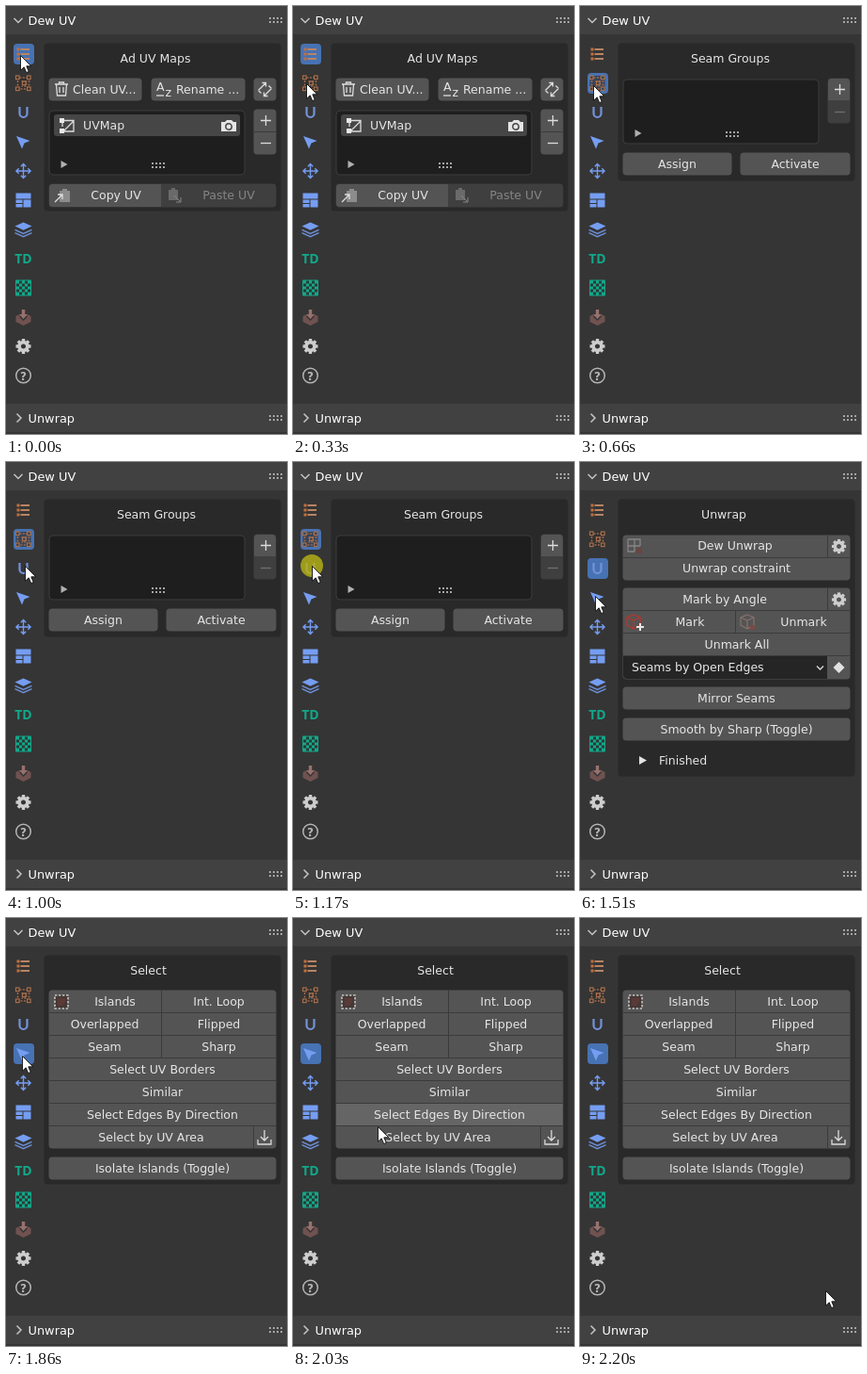
Animation, 299 px wide and 454 px high, one loop 2370 ms. Source, as an HTML page:

```html
<!DOCTYPE html>
<html lang="en">
<head>
<meta charset="utf-8">
<title>UV tools sidebar</title>
<style>
  html, body { margin: 0; width: 100%; height: 100%; overflow: hidden; background: #353535; }
  svg { display: block; width: 299px; height: 454px; }
  text { font: 12.5px "DejaVu Sans", sans-serif; fill: #e6e6e6; }
  .head { font-size: 12.9px; fill: #fff; }
  .dim { fill: #858585; }
  .td { font: bold 14px "Open Sans", sans-serif; fill: #12a88a; }
  .help { font-size: 12px; font-weight: bold; fill: #b4b4b4; }
  .line { fill: none; stroke: #dcdcdc; stroke-width: 1.3; }
  .blue { fill: #759df2; }
  .anim { animation: 2370ms step-end infinite; }
</style>
</head>
<body>
<svg id="stage" viewBox="0 0 299 454"></svg>
<script>
const LOOP = 2370;
const BTN = '#545454', GAP = '#3b3b3b';

// Drawing helpers; all return markup
const rect = (x, y, w, h, fill, r = 0, more = '') =>
  `<rect x="${x}" y="${y}" width="${w}" height="${h}" rx="${r}" fill="${fill}" ${more}/>`;
const path = (d, attrs = 'class="line"') => `<path d="${d}" ${attrs}/>`;
const text = (s, x, y, anchor = 'middle', cls = '') =>
  `<text x="${x}" y="${Math.round(y + 4.5)}" text-anchor="${anchor}" class="${cls}">${s}</text>`;
const at = (x, y, body) => `<g transform="translate(${x} ${y})">${body}</g>`;
// Half-pixel rim keeps box edges soft
const box = (x, y, w, h, fill) => rect(x - .5, y - .5, w + 1, h + 1, fill, 4);
const button = (x, y, w, h = 23, fill = BTN) => box(x, y, w, h, fill);
const label = (s, x, y, w) => button(x, y, w) + text(s, x + w / 2, y + 11);
const cut = (x, y, w, h) => rect(x, y, w, h, GAP);
const panel = (h, title, cx) => box(41, 40, 251, h, '#292929') + text(title, cx, 55);

function grip(x, y) {
  let d = '';
  for (let i = 0; i < 8; i++) d += `M${x + (i % 4) * 4} ${y + (i >> 2) * 4}h2v2h-2z`;
  return path(d, 'fill="#a5a5a5"');
}

function gear(x, y, size) {
  let teeth = '';
  for (let a = 0; a < 360; a += 45) teeth += `<rect x="-1.7" y="-8" width="3.4" height="5" transform="rotate(${a})"/>`;
  return `<g transform="translate(${x} ${y}) scale(${size})" fill="#cdcdcd">${teeth}
    <circle r="4.4" fill="none" stroke="#cdcdcd" stroke-width="3.6"/></g>`;
}

function checker() {
  let d = '';
  for (let i = 0; i < 25; i++)
    if (i % 2) d += `M${(i % 5) * 3 - 7.5} ${Math.floor(i / 5) * 3 - 7.5}h3v3h-3z`;
  return rect(-8.5, -8.5, 17, 17, '#12a88a', 1) + path(d, 'fill="#2b3a37"');
}

const cube = (color) => path('M0 -7L7 -4V4L0 8L-7 4V-4ZM-7 -4L0 -1L7 -4M0 -1V8',
  `fill="none" stroke="${color}" stroke-width="1.3"`);

const listIcon = [-5, 0, 5].map(y =>
  rect(-7, y - 1.5, 3, 3, '#c2703d') + rect(-3, y - 1, 9.5, 2, '#b98462')).join('');

const seamIcon = rect(-8, -8, 16, 16, '#33302e', 1, 'fill-opacity=".7"') +
  path('M-4 -6H4M-6 -3V3M6 -3V3M-3 6H4M-2 -2H3V3H-2',
    'fill="none" stroke="#9a6a50" stroke-width="1.6" stroke-dasharray="2 1.4"') +
  [[-8, -8], [4, -8], [-1, -2], [-8, 4], [4, 4]].map(([x, y]) =>
    rect(x, y, 3.6, 3.6, 'none', 0, 'stroke="#a86f4c" stroke-width="1.2"')).join('');

const icons = [
  listIcon,
  seamIcon,
  path('M-4 -6V1A4 4 0 0 0 4 1V-6', 'fill="none" stroke="#7592d8" stroke-width="2.2"'),
  path('M-7.5 -6L7 -1L1 1.5L-1.5 7.5Z', 'class="blue"'),
  path('M0 -7V7M-7 0H7M-2.7 -4.8L0 -7.6L2.7 -4.8M-2.7 4.8L0 7.6L2.7 4.8M-4.8 -2.7L-7.6 0L-4.8 2.7M4.8 -2.7L7.6 0L4.8 2.7',
    'fill="none" stroke="#759df2" stroke-width="1.4"'),
  path('M-8 -7.5h16v6h-16zM-8 -.5h7v3.5h-7zM-8 4h7v3.5h-7zM0 -.5h8v8h-8z', 'class="blue"'),
  path('M-9 -3.5L0 -7.5L9 -3.5L0 .8Z', 'class="blue"') +
    path('M-9 .3L0 4.5L9 .3M-9 3.7L0 7.7L9 3.7', 'fill="none" stroke="#6d90d8" stroke-width="1.4"'),
  text('TD', 0, .8, 'middle', 'td'),
  checker(),
  path('M-8 -1L-4 -3V0L0 4L4 0V-3L8 -1V5L0 9L-8 5Z', 'fill="#705250"') +
    path('M-1.7 -8H1.7V-3H4.5L0 2L-4.5 -3H-1.7Z', 'fill="#97716d"'),
  gear(0, 0, 1),
  '<circle r="7.8" fill="none" stroke="#b4b4b4" stroke-width="1.5"/>' + text('?', 0, 0, 'middle', 'help')
];

const toolbar = icons.map((icon, i) => at(18.5, 51 + i * 31, icon)).join('');

const header = (y, title, arrow) =>
  rect(0, y, 299, 30, '#414141') + path(arrow, 'fill="none" stroke="#c4c4c4" stroke-width="1.5"') +
  text(title, 23.5, y + 15.5, 'start', 'head') + grip(280, y + 12);

const frame = (y, h) => rect(46, y, 208, h, '#1e1e1e', 4, 'stroke="#3c3c3c"') +
  path(`M58.5 ${y + h - 15}L65.5 ${y + h - 11}L58.5 ${y + h - 7}Z`, 'fill="#b0b0b0"') + grip(155, y + h - 13);
const plus = y => path(`M271 ${y}H282M276.5 ${y - 5.5}V${y + 5.5}`);
const minus = (y, color) => path(`M271 ${y}H282`, `stroke="${color}" stroke-width="1.3"`);

const mapsPanel = panel(177, 'Ad UV Maps', 159) +
  button(46, 77, 98) + text('Clean UV...', 71, 88, 'start') +
  at(59, 88, path('M-7 -5H7M-2.5 -5V-7H2.5V-5M-5.5 -5L-4.5 7H4.5L5.5 -5M-2 -2V4M2 -2V4')) +
  button(155, 77, 99) + text('Rename ...', 181, 88, 'start') +
  text('A', 160, 85, 'start') + text('z', 169.5, 91, 'start') + path('M160 95H168') +
  button(264, 77, 23) +
  at(275.5, 88.5, path('M-7 1L1 -7M-3 -7H1V-3M7 -1L-1 7M3 7H-1V3M-7 1L-4 4M7 -1L4 -4')) +
  frame(111, 68) + rect(51, 115, 198, 23, '#464646', 3) +
  at(65, 127, path('M-5 -5.5H7V6H-4M-5 -5L-5 1M-4 6L7 -5') +
    rect(-8, -8, 5, 5, '#e8e8e8') + rect(-8, 3, 5, 5, '#e8e8e8')) +
  text('UVMap', 82, 126, 'start') +
  at(237, 127, path('M-8 -4H-4L-2 -6H3L5 -4H8V6H-8Z', 'fill="#e4e4e4"') +
    '<circle cy="1" r="3.2" fill="#e4e4e4" stroke="#464646" stroke-width="1.5"/>') +
  button(264, 110, 23, 47) + cut(264, 133, 23, 1) + plus(121.5) + minus(145.5, '#dcdcdc') +
  button(46, 189, 241, 24, '#3f3f3f') + path('M165 189H50a4 4 0 0 0 -4 4v16a4 4 0 0 0 4 4H165Z', `fill="${BTN}"`) +
  at(60, 201, path('M-3 -5H8V7H-3ZM0 -7H5V-4H0Z', 'fill="#8c8c8c"') + path('M-8 7L0 -1M-5 -1H0V4')) +
  at(179, 201, path('M-6 -6H4V5H-6ZM-3 -8H1V-5H-3Z', 'fill="#6a6a6a"') +
    path('M0 0L7 7M7 2V7H2', 'fill="none" stroke="#858585"')) +
  text('Copy UV', 117, 200) + text('Paste UV', 237, 200, 'middle', 'dim');

const groupsPanel = panel(145, 'Seam Groups', 160) + frame(78, 68) +
  button(264, 77, 23, 47, '#3f3f3f') + path('M264 100V81a4 4 0 0 1 4 -4h15a4 4 0 0 1 4 4V100Z', `fill="${BTN}"`) +
  plus(88.5) + minus(112.5, '#6f6f6f') + label('Assign', 46, 156, 115) + label('Activate', 171, 156, 116);

const unwrapPanel = panel(293, 'Unwrap', 153) +
  button(46, 78, 241, 47) + cut(46, 101, 241, 1) + cut(263, 78, 1, 23) +
  at(58, 89, path('M-7 -7H6V0M-7 -7V6H0M0 -7V6M-7 0H6', 'fill="none" stroke="#858585" stroke-width="1.3"') +
    rect(2, 2, 6, 6, '#6a4541', 1)) +
  text('Dew Unwrap', 165, 88.5) + gear(275.5, 89.5, .95) + text('Unwrap constraint', 166.5, 112.5) +
  button(46, 134, 241, 96) + [157, 181, 205].map(y => cut(46, y, 241, 1)).join('') +
  cut(263, 134, 1, 23) + cut(165, 158, 1, 23) +
  text('Mark by Angle', 154, 145.5) + gear(275.5, 146, .95) +
  at(57, 169, cube('#b8352c')) + path('M64 171V179M60 175H68', 'stroke="#e6e6e6" stroke-width="2"') +
  at(178, 169, cube('#85706c')) + rect(181, 173, 5, 5, '#7a4a44', 1) +
  text('Mark', 117, 169.5) + text('Unmark', 238, 169.5) + text('Unmark All', 167, 193) +
  path('M46 206H263V230H50a4 4 0 0 1 -4 -4Z', 'fill="#252525"') +
  text('Seams by Open Edges', 55, 217, 'start') + path('M252 216.5L255.5 220L259 216.5') +
  path('M275.5 212L281.5 218L275.5 224L269.5 218Z', 'fill="#e2e2e2"') +
  label('Mirror Seams', 46, 239, 241) + label('Smooth by Sharp (Toggle)', 46, 272, 241) +
  path('M63 312L71 316.5L63 321Z', 'fill="#e2e2e2"') + text('Finished', 84, 316, 'start');

const rows = [['Islands', 'Int. Loop', 116], ['Overlapped', 'Flipped', 105], ['Seam', 'Sharp', 105]];
const wide = ['Select UV Borders', 'Similar', 'Select Edges By Direction'];
const selectPanel = panel(242, 'Select', 151.5) + button(46, 77, 241, 167) +
  `<g class="anim" style="animation-name:hover">${rect(46, 197, 241, 23, '#656565')}</g>` +
  [1, 2, 3, 4, 5, 6].map(i => cut(46, 76 + i * 24, 241, 1)).join('') +
  cut(165, 77, 1, 71) + cut(263, 221, 1, 23) +
  at(59, 89, rect(-7, -7, 14, 14, '#453836', 0, 'stroke="#c4c4c4" stroke-width="1.6" stroke-dasharray="2.4 1.6"') +
    path('M-4 -4H4V0L1 4H-4Z', 'fill="#5a3a36"')) +
  rows.map(([a, b, x], i) => text(a, x, 88 + i * 24) + text(b, 226.5, 88 + i * 24)).join('') +
  wide.map((s, i) => text(s, 166.5, 160 + i * 24)).join('') + text('Select by UV Area', 154.5, 232) +
  path('M275 225V236M271 232L275 236L279 232M268 235V240H282V235') + label('Isolate Islands (Toggle)', 46, 254, 241);

const panels = [mapsPanel, groupsPanel, unwrapPanel, selectPanel];
const starts = [0, 660, 1340, 1860];

// Stepped keyframes from [ms, value] pairs
const keys = (name, prop, steps) =>
  `@keyframes ${name}{${steps.map(([ms, v]) => `${(ms / LOOP * 100).toFixed(4)}%{${prop}:${v}}`).join('')}}`;
const span = (name, from, to) => keys(name, 'opacity',
  [...(from ? [[0, 0]] : []), [from, 1], ...(to < LOOP ? [[to, 0]] : [])]);

const pointer = [
  [0, 15, 52], [160, 16, 64], [330, 14, 82], [660, 14, 84], [830, 20, 108], [1000, 20, 110],
  [1340, 13, 131], [1510, 16, 142], [1860, 17, 146], [2030, 90, 221], [2200, 261, 395]
];

const style = document.createElement('style');
style.textContent =
  panels.map((_, i) => span('panel' + i, starts[i], starts[i + 1] || LOOP)).join('') +
  span('click', 1170, 1340) + span('hover', 2030, 2200) +
  keys('active', 'transform', starts.map((ms, i) => [ms, `translateY(${i * 31}px)`])) +
  keys('pointer', 'transform', pointer.map(([ms, x, y]) => [ms, `translate(${x}px,${y}px)`]));
document.head.append(style);

const anim = (name, body) => `<g class="anim" style="animation-name:${name}">${body}</g>`;
document.getElementById('stage').innerHTML =
  rect(0, 0, 299, 454, '#353535') +
  header(0, 'Dew UV', 'M8.5 13L13 17.5L17.5 13') +
  header(422, 'Unwrap', 'M11.5 432.5L16 437L11.5 441.5') +
  anim('active', rect(8, 40, 22, 22, '#4772b3', 4)) + toolbar +
  panels.map((p, i) => anim('panel' + i, p)).join('') +
  anim('click', '<circle cx="20" cy="110" r="12" fill="#b9b414" fill-opacity=".8"/>') +
  anim('pointer', path('M.5 .5V16.2L4.2 12.8L6.7 18.6L9.2 17.5L6.8 11.8H11.8Z',
    'fill="#fff" stroke="#111" stroke-width=".9"'));
</script>
</body>
</html>
```
